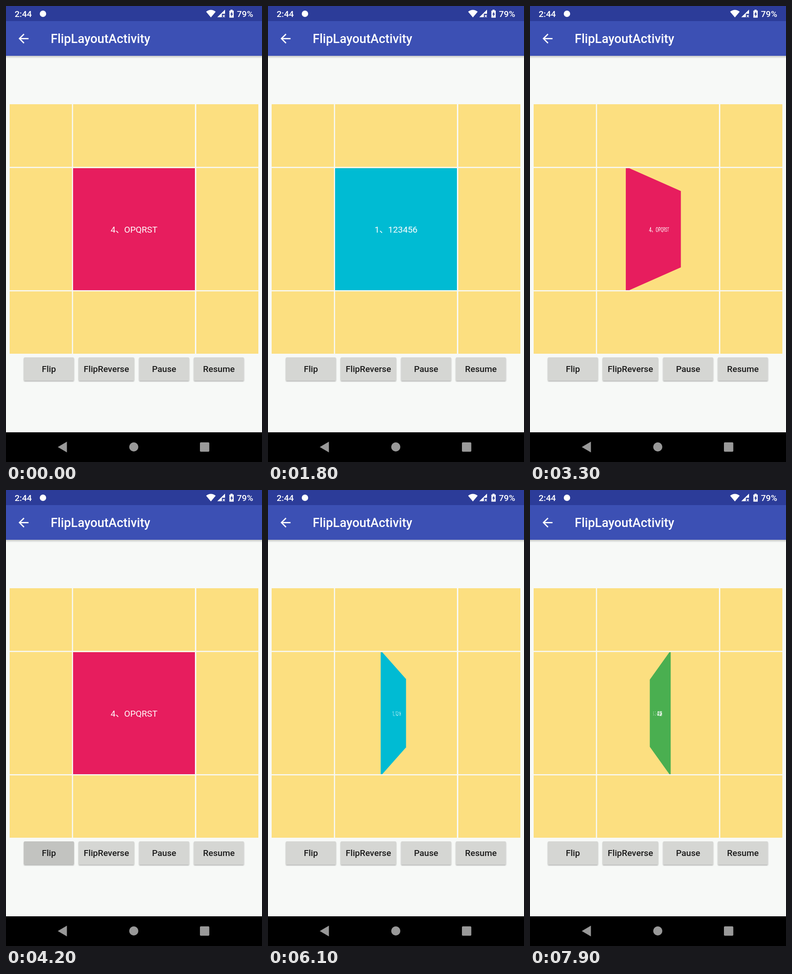
Recreate the animation shown at these times as an HTML page. Size 561 px wide and 998 px high, loop 8000 ms.

```html
<!DOCTYPE html>
<html lang="en">
<head>
<meta charset="utf-8">
<title>FlipLayoutActivity</title>
<style>
  html, body { margin: 0; width: 100%; height: 100%; overflow: hidden; background: #f7f9f7; }
  #stage { position: relative; width: 561px; height: 998px; overflow: hidden; }
  svg { position: absolute; left: 0; top: 0; display: block; }
  text { font-family: Roboto, "Noto Sans CJK SC", "Noto Sans CJK", sans-serif; font-size: 19.1px; }
  .medium { font-weight: 500; }
  #cell { position: absolute; left: 147px; top: 354.5px; width: 267px; height: 267px; overflow: hidden; }
  #card { position: absolute; width: 267px; height: 267px; transform-origin: 50% 50%; }
</style>
</head>
<body>
<div id="stage">
  <svg width="561" height="998" viewBox="0 0 561 998">
    <defs>
      <linearGradient id="shade" x2="0" y2="1">
        <stop offset="0" stop-opacity=".2"/>
        <stop offset="1" stop-opacity="0"/>
      </linearGradient>
      <filter id="lift" x="-10%" y="-10%" width="120%" height="130%">
        <feDropShadow dx="0" dy="1.6" stdDeviation="1.2" flood-opacity=".3"/>
      </filter>
    </defs>
    <rect width="561" height="998" fill="#f7f9f7"/>
    <rect y="109" width="561" height="6" fill="url(#shade)"/>
    <rect y="33" width="561" height="76" fill="#3c50b4"/>
    <rect width="561" height="33" fill="#2c3c99"/>

    <g fill="#fff" class="medium">
      <text x="19" y="24">2:44</text>
      <circle cx="81" cy="17" r="7"/>
      <path d="M438.5 12.5Q449 4.5 459.500 12.500L449 25Z"/>
      <path d="M480 8V17H473V24.500H463Z"/>
      <path d="M475 19.500L479.500 24.500M479.500 19.500L475 24.500" stroke="#fff" stroke-width="1.500"/>
      <path d="M492 8H496.500V10H499V25.500H489.500V10H492Z"/>
      <path d="M495.500 12L491.500 18.500H493.700V23.500L497.500 16.800H495.500Z" fill="#2c3c99"/>
      <text x="506" y="24">79%</text>
      <path transform="translate(22.1 55) scale(1.364)"
        d="M20 11H7.830l5.590-5.590L12 4l-8 8 8 8 1.410-1.410L7.830 13H20z"/>
      <text x="98" y="81" style="font-size:27.3px">FlipLayoutActivity</text>
    </g>

    <g id="grid" fill="#fcdf80"></g>
    <g id="buttons" class="medium" text-anchor="middle"></g>

    <rect y="933" width="561" height="65"/>
    <g fill="#999">
      <path d="M133.500 953.500V977L113.500 965.200Z"/>
      <circle cx="280" cy="965" r="10"/>
      <rect x="425" y="955" width="20.500" height="20.500" rx="2"/>
    </g>
  </svg>
  <div id="cell">
    <div id="card">
      <svg width="267" height="267">
        <text id="label" x="133.5" y="141" fill="#fff" text-anchor="middle"></text>
      </svg>
    </div>
  </div>
</div>
<script>
const $ = id => document.getElementById(id);

function add(parent, tag, attrs, text = '') {
  const el = document.createElementNS('http://www.w3.org/2000/svg', tag);
  for (const key in attrs) el.setAttribute(key, attrs[key]);
  el.textContent = text;
  return parent.appendChild(el);
}

const cols = [[8, 136.5], [147, 267], [417, 136]];
const rows = [[215, 137], [354.5, 267.5], [624.5, 136.5]];
for (const [y, height] of rows)
  for (const [x, width] of cols) add($('grid'), 'rect', { x, y, width, height });

const ripples = [['Flip', 39, 110], ['FlipReverse', 159, 122], ['Pause', 291.5, 110], ['Resume', 411.5, 110]]
  .map(([name, x, width]) => {
    const box = { x, y: 769, width, height: 51, rx: 2.5 };
    add($('buttons'), 'rect', { ...box, fill: '#d5d6d3', filter: 'url(#lift)' });
    const ripple = add($('buttons'), 'rect', { ...box, opacity: 0 });
    add($('buttons'), 'text', { x: x + width / 2, y: 801, fill: '#1b1b1b' }, name);
    return ripple;
  });

const faces = [
  ['1、123456', '#00bbd3'],
  ['2、ABCDEF', '#f24134'],
  ['3、GHIJKLMN', '#4aaf50'],
  ['4、OPQRST', '#e71d5e']
];
const LOOP = 8000, STEP = 100, FLIP = 1150, HALF = 133.5;

// dir 1 is Flip, -1 is FlipReverse
const flips = [
  { press: 500, start: 540, from: 3, to: 0, dir: 1 },
  { press: 2400, start: 2513, from: 0, to: 3, dir: -1 },
  { press: 4100, start: 4250, from: 3, to: 0, dir: 1 },
  { press: 5600, start: 5622, from: 0, to: 1, dir: 1 },
  { press: 7200, start: 7245, from: 1, to: 2, dir: 1 }
];

// Turns the card by angle (degrees); a positive angle brings the left edge forward.
function turn(angle) {
  const deg = Math.abs(angle), rad = deg * Math.PI / 180;
  const sin = Math.sin(rad), cos = Math.cos(rad);
  const near = 1 + 0.03 * sin, far = 1 / (1 + 0.0105 * deg);
  const shift = 9.5 * sin * cos;
  const nearX = HALF * cos * near - shift, farX = HALF * cos * far + shift;
  const [left, right, xl, xr] = angle > 0 ? [near, far, -nearX, farX] : [far, near, -farX, nearX];
  const g = (left - right) / (left + right);
  const k = 2 * left * right / (left + right);
  const a = xr * (1 + g), b = xl * (1 - g);
  const m = [(a - b) / (2 * HALF), 0, 0, g / HALF, 0, k, 0, 0, 0, 0, 1, 0, (a + b) / 2, 0, 0, 1];
  $('card').style.transform = `matrix3d(${m.map(v => v.toFixed(7))})`;
}

function draw(now) {
  const t = Math.floor(now % LOOP / STEP) * STEP;
  const flip = flips.filter(f => t >= f.press).pop() || flips[0];
  const p = Math.min(1, Math.max(0, (t - flip.start) / FLIP));
  const [label, color] = faces[p < 0.5 ? flip.from : flip.to];
  $('label').textContent = label;
  $('card').style.background = color;
  turn(flip.dir * 180 * (p < 0.5 ? p : p - 1));

  const age = t - flip.press;
  const glow = age >= 0 && age < 400 ? 0.12 * (1 - age / 400) : 0;
  ripples.forEach((r, i) => r.setAttribute('opacity', i === (flip.dir > 0 ? 0 : 1) ? glow : 0));
}

const begin = performance.now();
function tick() {
  draw(performance.now() - begin);
  requestAnimationFrame(tick);
}
tick();
</script>
</body>
</html>
```
